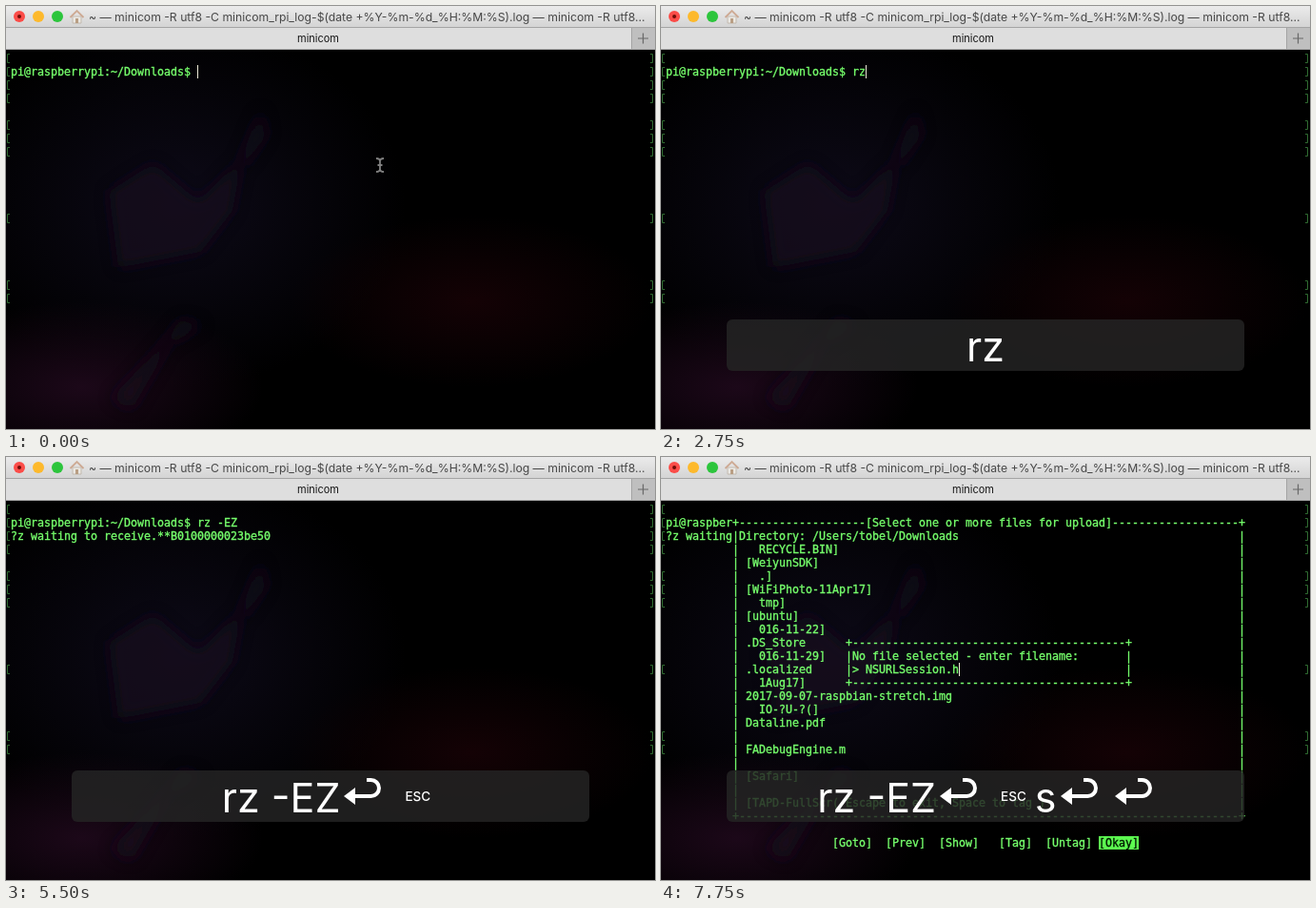
These frames come from a looping animation (682 px wide and 444 px high, 8000 ms). An HTML page:

```html
<!DOCTYPE html>
<html lang="en">
<head>
<meta charset="utf-8">
<title>Terminal session</title>
<style>
  html, body { margin: 0; width: 100%; height: 100%; overflow: hidden; background: #000; }
  #stage { position: relative; width: 682px; height: 444px; overflow: hidden; background: #000; }
  #stage > * { position: absolute; }
  #scene { left: 0; top: 0; }
  .ui { font-family: Inter, sans-serif; }
  #term, #okay {
    margin: 0; white-space: pre; color: #76ff6c;
    font: 11.63px/14px "DejaVu Sans Mono", monospace;
    -webkit-text-stroke: .35px currentColor;
  }
  #term { left: 5px; top: 48px; }
  #okay { left: 460px; top: 398px; color: #001800; background: #5cfa50; }
  #caret { width: 1px; height: 14px; background: #ecead8; }
  #keys {
    left: 69px; top: 329px; width: 544px; height: 54px; border-radius: 6px;
    display: flex; justify-content: center; align-items: center;
    background: rgba(36, 36, 36, .84); color: #fff;
    font: 43px/54px Inter, sans-serif; white-space: pre;
  }
  #keys span { position: relative; top: 1px; }
  #keys small { font-size: 13.5px; font-weight: 500; margin: 0 9px 0 23px; }
  #keys svg { align-self: flex-start; margin: 7px 2px 0 4px; }
</style>
</head>
<body>
<div id="stage">
  <svg id="scene" width="682" height="444">
    <defs>
      <linearGradient id="bar" x2="0" y2="1">
        <stop stop-color="#ebebeb"/><stop offset="1" stop-color="#d3d3d3"/>
      </linearGradient>
      <radialGradient id="blue">
        <stop stop-color="#0d0a18"/><stop offset="1" stop-color="#0d0a18" stop-opacity="0"/>
      </radialGradient>
      <radialGradient id="plum">
        <stop stop-color="#1c0819"/><stop offset="1" stop-color="#1c0819" stop-opacity="0"/>
      </radialGradient>
      <radialGradient id="red">
        <stop stop-color="#140205"/><stop offset="1" stop-color="#140205" stop-opacity="0"/>
      </radialGradient>
      <filter id="soft"><feGaussianBlur stdDeviation="8"/></filter>
    </defs>

    <ellipse cx="180" cy="210" rx="240" ry="190" fill="url(#blue)"/>
    <ellipse cx="80" cy="400" rx="190" ry="90" fill="url(#plum)"/>
    <ellipse cx="490" cy="310" rx="190" ry="90" fill="url(#red)"/>
    <g fill="#140a1e" opacity=".8" filter="url(#soft)">
      <path d="M108 195L155 165 202 205 248 160 238 215 205 258 118 275Z"/>
      <path d="M244 165L268 108 274 135 252 168Z"/>
      <path d="M208 335L172 355 132 424 110 412 150 370 185 328Z"/>
    </g>

    <rect width="682" height="23" fill="url(#bar)"/>
    <rect y="23" width="682" height="23" fill="#dedede"/>
    <rect x="657" y="23" width="25" height="23" fill="#bfbfbf"/>
    <path d="M0 22.5H682M657.5 23V45M0 45.5H682" stroke="#a4a4a4" fill="none"/>
    <path d="M664 34H675M669.5 28.500V39.500" stroke="#686868" stroke-width="1.2"/>
    <circle cx="14" cy="11" r="6" fill="#fb4c48"/>
    <circle cx="14" cy="11" r="2" fill="#6e0d08"/>
    <circle cx="34" cy="11" r="6" fill="#fdb92c"/>
    <circle cx="54" cy="11" r="6" fill="#2cc53c"/>
    <g opacity=".6">
      <path d="M70 11V18H79V11Z" fill="#f6f1e8" stroke="#b3a593"/>
      <path d="M67.500 12L74.500 5 81.500 12" fill="none" stroke="#c08560" stroke-width="1.800"/>
      <path d="M73 13H76V18H73Z" fill="#a4774c"/>
    </g>
    <g class="ui">
      <text x="87" y="16" font-size="12.2" fill="#484848">~ — minicom -R utf8 -C minicom_rpi_log-$(date +%Y-%m-%d_%H:%M:%S).log — minicom -R utf8...</text>
      <text x="328" y="38" font-size="11" fill="#161616" text-anchor="middle">minicom</text>
    </g>
    <path id="marks" fill="none" stroke="#2f6a30"/>
    <path id="mouse" d="M389 160Q393 160 393 163V171Q393 174 389 174M397 160Q393 160 393 163M393 171Q393 174 397 174M390.500 167H395.500"
      fill="none" stroke="#808080" stroke-width="1.800"/>
  </svg>
  <pre id="term"></pre>
  <span id="okay">[Okay]</span>
  <div id="caret"></div>
  <div id="keys"></div>
</div>
<script>
const LOOP = 8000, COL = 7, ROW = 14;
const PROMPT = 'pi@raspberrypi:~/Downloads$ ';
const SHELL = 0, WAIT = 1, FILES = 2, ASK = 3;
const $ = id => document.getElementById(id);

// time, screen, typed text, key overlay
const steps = [
  [0, SHELL, '', ''],
  [1250, SHELL, 'r', ''],
  [2000, SHELL, 'r', 'r'],
  [2500, SHELL, 'rz', 'rz'],
  [3000, SHELL, 'rz ', 'rz '],
  [3250, SHELL, 'rz -', 'rz -'],
  [3500, SHELL, 'rz -E', 'rz -E'],
  [4000, SHELL, 'rz -EZ', 'rz -EZ'],
  [4500, WAIT, '', 'rz -EZ↵'],
  [5000, WAIT, '', 'rz -EZ↵⎋'],
  [6000, WAIT, '', 'rz -EZ↵⎋s'],
  [6250, FILES, '', 'rz -EZ↵⎋s'],
  [6500, FILES, '', 'rz -EZ↵⎋s↵'],
  [6750, ASK, '', 'rz -EZ↵⎋s↵'],
  [7000, ASK, '', 'rz -EZ↵⎋s↵ ↵'],
  [7500, ASK, 'NSURLSession.h', 'rz -EZ↵⎋s↵ ↵']
];

const files = [
  '   RECYCLE.BIN]', ' [WeiyunSDK]', '   .]', ' [WiFiPhoto-11Apr17]', '   tmp]',
  ' [ubuntu]', '   016-11-22]', ' .DS_Store', '   016-11-29]', ' .localized',
  '   1Aug17]', ' 2017-09-07-raspbian-stretch.img', '   IO-?U-?(]', ' Dataline.pdf',
  '', ' FADebugEngine.m', '', ' [Safari]', '',
  ' [TAPD-FullScr( Escape to exit, Space to tag )'
];
const buttons = [[25, '[Goto]'], [33, '[Prev]'], [41, '[Show]'], [50, '[Tag]'], [57, '[Untag]']];

function put(grid, row, col, text) {
  const line = grid[row].padEnd(col);
  grid[row] = line.slice(0, col) + text + line.slice(col + text.length);
}

function box(grid, row, col, inner, lines, title = '') {
  const rule = '-'.repeat(inner), side = '-'.repeat((inner - title.length) / 2);
  put(grid, row, col, '+' + (title ? side + title + side : rule) + '+');
  lines.forEach((s, i) => put(grid, row + 1 + i, col, '|' + s.padEnd(inner) + '|'));
  put(grid, row + 1 + lines.length, col, '+' + rule + '+');
}

function screenText(screen, typed) {
  const grid = Array(26).fill('');
  put(grid, 1, 0, PROMPT + (screen === SHELL ? typed : 'rz -EZ'));
  if (screen >= WAIT) put(grid, 2, 0, '?z waiting to receive.**B0100000023be50');
  if (screen >= FILES) {
    box(grid, 1, 10, 75, ['Directory: /Users/tobel/Downloads', ...files],
      '[Select one or more files for upload]');
    // the frame replaces whatever stood to its right
    grid[1] = grid[1].slice(0, 87);
    buttons.forEach(([col, label]) => put(grid, 25, col, label));
  }
  if (screen === ASK) box(grid, 10, 27, 41, ['No file selected - enter filename:', '> ' + typed]);
  return grid.join('\n');
}

function caretAt(screen, typed) {
  return [
    [PROMPT.length + typed.length, 1], [1, 2], [11, 3], [30 + typed.length, 12]
  ][screen];
}

const glyphs = {
  '↵': '<svg width="39" height="30"><path d="M9 20H28.500a8.500 8.500 0 0 0 0-17H24" fill="none" stroke="#fff" stroke-width="4"/><path d="M0 20L12 11V29Z" fill="#fff"/></svg>',
  '⎋': '<small>ESC</small>'
};
const keyMarkup = keys => keys.split(/([↵⎋])/).filter(Boolean)
  .map(k => glyphs[k] || `<span>${k}</span>`).join('');

function show([t, screen, typed, keys]) {
  $('term').textContent = screenText(screen, typed);
  $('okay').hidden = screen < FILES;
  $('keys').innerHTML = keyMarkup(keys);
  $('keys').style.display = keys ? 'flex' : 'none';
  $('mouse').style.display = t ? 'none' : '';
  const [col, row] = caretAt(screen, typed);
  $('caret').style.left = 5 + col * COL + 'px';
  $('caret').style.top = 48 + row * ROW + 'px';
}

$('marks').setAttribute('d', [0, 1, 2, 3, 5, 6, 7, 12, 17, 18].map(r => {
  const y = 50.5 + r * ROW;
  return `M4 ${y}H1.500v9H4M677 ${y}h2.500v9H677`;
}).join(''));

let current;
function frame(now) {
  const t = now % LOOP;
  const step = steps.findLast(s => s[0] <= t) || steps[0];
  if (step !== current) show(current = step);
  // the caret stays lit for a moment after each key
  const lit = t % 1000 < 500 || t - step[0] < 500;
  $('caret').style.visibility = lit ? 'visible' : 'hidden';
  requestAnimationFrame(frame);
}
frame(0);
</script>
</body>
</html>
```
